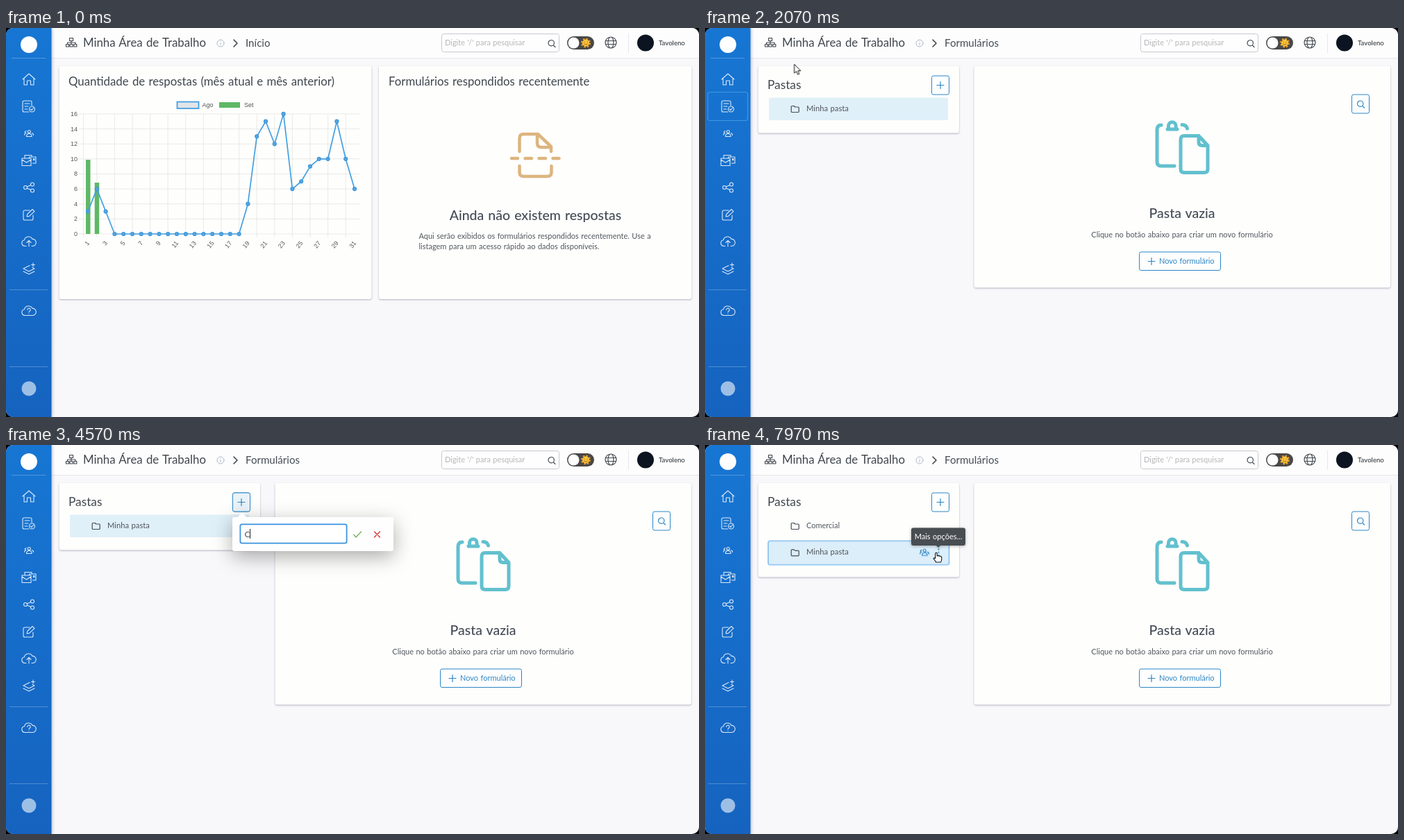
An HTML page for the animation above (8 s loop, 998x561 px).

```html
<!DOCTYPE html>
<html lang="pt-BR">
<head>
<meta charset="utf-8">
<title>Minha Área de Trabalho</title>
<style>
html, body { margin: 0; width: 100%; height: 100%; overflow: hidden; background: #000; }
svg.stage { display: block; width: 100vw; height: 100vh; border-radius: 10px; }
text, .field { font-family: Lato, "Open Sans", sans-serif; font-size: 11px; word-spacing: .06em; fill: #50565c; }
.h1 { font-size: 16.8px; fill: #3f464d; }
.crumb { font-size: 15.1px; fill: #454c53; }
.big { font-size: 19.5px; font-weight: 500; fill: #444b55; text-anchor: middle; }
.mid { text-anchor: middle; }
.axis text { font: 9px "Liberation Sans", Arial, sans-serif; fill: #555; }
.line { fill: none; stroke-linecap: round; stroke-linejoin: round; }
.nav { stroke: #fff; stroke-width: 1.1; opacity: .85; }
.dark { stroke: #454b52; stroke-width: 1.2; }
.blue { stroke: #2b86c5; stroke-width: 1.2; }
.btn { fill: #fefefe; stroke: #2b86c5; }
.card { fill: #fefefd; filter: drop-shadow(0 1px 1.2px rgba(40, 40, 80, .35)); }
.tip text { fill: #fff; }
.tip path { fill: #484d52; filter: drop-shadow(0 1px 2px rgba(0, 0, 0, .3)); }
.field { display: flex; align-items: center; height: 18px; color: #4a4f55; }
.field b { font-weight: 400; font-size: 0; animation: type 8s step-end infinite; }
.field i { width: 1px; height: 14px; background: #222; animation: caret 8s step-end infinite; }

.a { animation: 8s linear infinite; }
.hard { animation-timing-function: step-end; }
.page1 { animation-name: page1; }
.page2 { animation-name: page2; }
.hover { animation-name: hover; }
.focus { animation-name: focus; }
.tipForms { animation-name: tipForms; }
.tipNew { animation-name: tipNew; }
.tipMore { animation-name: tipMore; }
.pop { animation-name: pop; }
.plusOn { animation-name: plusOn; }
.tick { animation-name: tick; }
.grow { animation-name: grow; }
.row { animation-name: row; }
.added { animation-name: added; }
.rowIcons { animation-name: rowIcons; }
.rowFocus { animation-name: rowFocus; }
.cursor { animation-name: cursor; }
.shown { animation-name: shown; }
.arrow { animation-name: arrow; }
.hand { animation-name: hand; }

@keyframes page1 { 0%, 18.5% { opacity: 1 } 19.6%, 100% { opacity: 0 } }
@keyframes page2 { 0%, 19.2% { opacity: 0 } 21%, 100% { opacity: 1 } }
@keyframes hover { 0%, 9.8% { opacity: 0 } 11%, 21.5% { opacity: 1 } 23%, 100% { opacity: 0 } }
@keyframes focus { 0% { opacity: 0 } 17.1% { opacity: 1 } 48.4%, 100% { opacity: 0 } }
@keyframes tipForms { 0%, 10.6% { opacity: 0 } 12.3%, 21.6% { opacity: 1 } 23%, 100% { opacity: 0 } }
@keyframes tipNew { 0%, 37.4% { opacity: 0 } 40%, 48.4% { opacity: 1 } 50%, 100% { opacity: 0 } }
@keyframes tipMore { 0%, 97.6% { opacity: 0 } 99.5%, 100% { opacity: 1 } }
@keyframes pop { 0%, 48.6% { opacity: 0 } 51.4%, 73.4% { opacity: 1 } 75.8%, 100% { opacity: 0 } }
@keyframes plusOn { 0%, 36.4% { opacity: 0 } 38%, 81.3% { opacity: 1 } 83.5%, 100% { opacity: 0 } }
@keyframes tick { 0% { stroke: #c4c8c4 } 57.1%, 100% { stroke: #7cb058 } }
@keyframes grow { 0%, 73.4% { height: 96.5px } 75%, 100% { height: 135.5px } }
@keyframes row { 0%, 73.4% { transform: none } 75%, 91.2% { transform: translateY(39px) } 92%, 100% { transform: translateY(38.3px) } }
@keyframes added { 0%, 74% { opacity: 0 } 75.5%, 100% { opacity: 1 } }
@keyframes rowIcons { 0%, 85% { opacity: 0 } 86.5%, 100% { opacity: 1 } }
@keyframes rowFocus { 0%, 91.2% { opacity: 0 } 93.5%, 100% { opacity: 1 } }
@keyframes type { 0% { font-size: 0 } 63.875% { font-size: 11.8px } 90%, 100% { font-size: 0 } }
@keyframes caret { 0% { opacity: 1 } 55.37% { opacity: 0 } 57.1% { opacity: 1 } 63.37% { opacity: 0 } 63.87%, 100% { opacity: 1 } }
@keyframes cursor {
  0%, .4% { transform: translate(330px, 580px); animation-timing-function: ease-in-out }
  10.4%, 21% { transform: translate(32px, 109px); animation-timing-function: ease-in }
  25.9% { transform: translate(129px, 52px); animation-timing-function: ease-out }
  30%, 33.4% { transform: translate(215px, 66px); animation-timing-function: ease-in-out }
  37.4%, 81.25% { transform: translate(348px, 85px); animation-timing-function: ease-in-out }
  88%, 95.8% { transform: translate(250px, 152px); animation-timing-function: ease-in-out }
  98.2%, 100% { transform: translate(333px, 155px) }
}
@keyframes shown { 0% { opacity: 1 } 57.1% { opacity: 0 } 81.25%, 100% { opacity: 1 } }
@keyframes arrow { 0% { opacity: 1 } 9.5% { opacity: 0 } 22.4% { opacity: 1 } 36.6% { opacity: 0 } 82.5% { opacity: 1 } 86%, 100% { opacity: 0 } }
@keyframes hand { 0% { opacity: 0 } 9.5% { opacity: 1 } 22.4% { opacity: 0 } 36.6% { opacity: 1 } 82.5% { opacity: 0 } 86%, 100% { opacity: 1 } }
</style>
</head>
<body>
<svg class="stage" viewBox="0 0 998 561">
  <defs>
    <linearGradient id="side" x2="0" y2="1">
      <stop stop-color="#1776d3"/><stop offset="1" stop-color="#1563bf"/>
    </linearGradient>
    <path id="cloud" d="M-4 6.500H-6A4.400 4.400 0 0 1-6.600-2.200A6.200 6.200 0 0 1 5-3.600A5 5 0 0 1 5.500 6.500H4"/>
    <path id="folder" d="M-5.500-3.500q0-1 1-1h3l1.500 1.500h4.500q1 0 1 1v5.500q0 1-1 1h-9q-1 0-1-1z"/>
    <path id="people" d="M-1.700-2.500a2 2 0 1 0 4 0a2 2 0 1 0-4 0M-3.500 4.500q0-4 3.800-4t3.800 4zM-3.800-3.200a1.400 1.400 0 1 0-.2 2.700Q-6.300-.3-6.300 2.200M4.300-.3Q6.500 0 6.500 2.500"/>
    <path id="lens" d="M-5-.8a4.200 4.200 0 1 0 8.400 0a4.200 4.200 0 1 0-8.400 0M2.200 2.300L5 5"/>
    <path id="plus" d="M-5 0H5M0-5V5"/>
  </defs>

  <rect width="998" height="561" fill="#f8f8fa"/>

  <!-- header -->
  <rect x="65" width="933" height="43" fill="#fdfdfd"/>
  <path d="M65 43.500H998" stroke="#e6e7ea"/>
  <path class="line dark" d="M91.500 14.500h5v4h-5zM86.500 23.500h4v3.500h-4zM92 23.500h4v3.500h-4zM97.800 23.500h4v3.500h-4zM94 18.500v5M88.500 23.500V21H100v2.500"/>
  <text class="h1" x="111" y="27">Minha Área de Trabalho</text>
  <g class="line" stroke="#b3b8cb"><circle cx="309" cy="22" r="5"/><path d="M309 21.500v3M309 19.300v.1"/></g>
  <path class="line" d="M328 17l5 5-5 5" stroke="#41474d" stroke-width="1.600"/>
  <text class="crumb a page1" x="345" y="27">Início</text>
  <text class="crumb a page2" x="345" y="27">Formulários</text>
  <rect x="627.500" y="8.500" width="169" height="26" rx="3" fill="#fefefe" stroke="#c6c9cf"/>
  <text x="632" y="25" style="fill:#b5b6b9">Digite '/' para pesquisar</text>
  <use href="#lens" class="line dark" x="786" y="22.500"/>
  <rect x="808" y="12" width="39" height="19" rx="9.500" fill="#484848"/>
  <circle cx="817.500" cy="21.500" r="8" fill="#fdfdfd"/>
  <circle cx="835" cy="21.500" r="5.800" fill="none" stroke="#e99b28" stroke-width="2.500" stroke-dasharray="2.500 2"/>
  <circle cx="835" cy="21.500" r="5" fill="#fbc53a"/>
  <path class="line" d="M833 20v.6M837 20v.6M832.500 23q2.500 2.500 5 0" stroke="#a76618"/>
  <path class="line dark" d="M863 21a8 8 0 1 0 16 0a8 8 0 1 0-16 0zM867 21a4 8 0 1 0 8 0a4 8 0 1 0-8 0zM863.500 18.500h15M863.500 23.500h15"/>
  <path d="M896.500 8V36" stroke="#e6e7ec"/>
  <circle cx="921" cy="21.500" r="12" fill="#0b1420"/>
  <text x="940" y="25" style="font-size:9.600px;font-weight:500;fill:#333a40">Tavoleno</text>

  <!-- dashboard -->
  <g class="a page1">
    <rect class="card" x="76.500" y="55" width="450" height="336" rx="3"/>
    <rect class="card" x="537" y="55" width="450.500" height="336" rx="3"/>
    <text class="h1" x="90" y="83">Quantidade de respostas (mês atual e mês anterior)</text>
    <text class="h1" x="551" y="83">Formulários respondidos recentemente</text>
    <g id="chart" class="axis"></g>
    <path class="line" stroke="#dcb57f" stroke-width="4.500" d="M739.500 178v-19q0-6 6-6H766l19 18v7M765 153v13q0 6 6 6h14M739.500 199v9q0 6 6 6h34q6 0 6-6v-9M728 188h9M747.500 188h9.500M767.500 188h9.500M787.500 188h9"/>
    <text class="big" x="762.500" y="276.500">Ainda não existem respostas</text>
    <text x="594.500" y="304">Aqui serão exibidos os formulários respondidos recentemente. Use a</text>
    <text x="594.500" y="319">listagem para um acesso rápido ao dados disponíveis.</text>
  </g>

  <!-- forms -->
  <g class="a page2">
    <rect class="card a grow" x="76.500" y="55" width="289.500" height="96.500" rx="3"/>
    <rect class="card" x="387.500" y="55" width="599.500" height="319.500" rx="3"/>
    <text class="h1" style="font-size:17.300px" x="90" y="87.500">Pastas</text>
    <rect class="btn" x="326.500" y="69" width="25" height="27" rx="2.500"/>
    <rect class="btn a plusOn" x="326.500" y="69" width="25" height="27" rx="2.500" style="fill:#e8f2f9"/>
    <use href="#plus" class="line blue" x="339" y="82.500"/>
    <g class="a added">
      <use href="#folder" class="line dark" x="129.700" y="117"/>
      <text x="146" y="120">Comercial</text>
    </g>
    <g class="a row">
      <rect x="92" y="100.500" width="258" height="32.500" rx="2" fill="#e0f0f9"/>
      <rect class="a rowFocus" x="91" y="100" width="260.500" height="34.500" rx="3" fill="#dceefa" stroke="#84c0f0" stroke-width="1.600"/>
      <use href="#folder" class="line dark" x="129.700" y="117"/>
      <text x="146" y="120" style="font-size:11.200px">Minha pasta</text>
      <g class="a rowIcons">
        <use href="#people" class="line blue" x="316" y="116.500"/>
        <path class="line" d="M336.500 112v.1M336.500 116.500v.1M336.500 121v.1" stroke="#2b86c5" stroke-width="2.200"/>
      </g>
    </g>
    <rect class="btn" x="931.500" y="96" width="25" height="27" rx="2.500"/>
    <use href="#lens" class="line blue" x="944.500" y="110"/>
    <path class="line" stroke="#62c0ce" stroke-width="5" d="M676 199h-19q-6 0-6-6V147q0-7 6-7M666 146h14M667.500 145v-4a5.300 5.300 0 0 1 10.600 0v4M687 139.500q6 0 7.500 5.500M711 155.500h-21q-5 0-5 5v43q0 5 5 5h29q5 0 5-5v-34l-13-14v9q0 5 5 5h8"/>
    <text class="big" x="687" y="273.500">Pasta vazia</text>
    <text class="mid" x="687" y="302">Clique no botão abaixo para criar um novo formulário</text>
    <rect class="btn" x="625.500" y="323" width="117" height="26.500" rx="2.500"/>
    <use href="#plus" class="line blue" x="643" y="336.500"/>
    <text x="654" y="340" style="fill:#2b86c5">Novo formulário</text>
  </g>

  <!-- sidebar -->
  <rect width="65.500" height="561" fill="url(#side)" style="filter:drop-shadow(1px 0 2px rgba(30,60,140,.35))"/>
  <path d="M8 43.500H57M5 377.500H60M5 488.500H60" stroke="#fff" opacity=".25"/>
  <circle cx="33" cy="24" r="12" fill="#fff"/>
  <rect class="a hover" x="5" y="94" width="55.500" height="38.500" rx="3" fill="#fff" fill-opacity=".13"/>
  <rect class="a hard focus" x="4" y="92.500" width="57.500" height="41" rx="3" fill="none" stroke="#3f97e2" stroke-width="1.200"/>
  <g class="line nav">
    <path transform="translate(33 74)" d="M-9 0L0-8 9 0M-7-1.500V8h4.500V2h5V8H7V-1.500"/>
    <path transform="translate(32 113)" d="M1 8H-6a2 2 0 0 1-2-2V-6a2 2 0 0 1 2-2H3a2 2 0 0 1 2 2V-1.500M-5-4H2M-5 0H0M-5 4H-1M1.500 4a4 4 0 1 0 8 0a4 4 0 1 0-8 0M3.500 4l1.500 1.500L7.500 2.500"/>
    <use href="#people" x="33" y="152"/>
    <path transform="translate(33 191)" d="M-6-3V-7.500H4V-5M5.500 4H10V-5H.5V-3M-10-3H3V7.500H-10zM-10-1L-3.500 3 3-1M6.500-2.500h1.500v2H6.500z"/>
    <path transform="translate(33 230)" d="M-7.500 0a2.500 2.500 0 1 0 5 0a2.500 2.500 0 1 0-5 0M2.500-4.500a2.500 2.500 0 1 0 5 0a2.500 2.500 0 1 0-5 0M2.500 4.500a2.500 2.500 0 1 0 5 0a2.500 2.500 0 1 0-5 0M-2.700-1L2.700-3.500M-2.700 1L2.700 3.500"/>
    <path transform="translate(33 269)" d="M1-6H-6a2 2 0 0 0-2 2V6a2 2 0 0 0 2 2H4a2 2 0 0 0 2-2V1M-3 3l.8-3.500L5-7.500 8-4.700.6 2.400z"/>
    <g transform="translate(33 308)"><use href="#cloud"/><path d="M0 7V-1.500M-3 1.500L0-1.500 3 1.500"/></g>
    <path transform="translate(33 347)" d="M1-4.500L-8 0 0 4 8 0 5-1.500M-8 4L0 8 8 4M6-8v5M3.500-5.500h5"/>
    <g transform="translate(33 408)"><use href="#cloud"/><path d="M-4 6.500H4M-2.200-1.500a2.200 2.200 0 1 1 3.300 1.800Q0 1 0 2M0 4v.1"/></g>
  </g>
  <circle cx="33" cy="520" r="10.500" fill="#9dbfe6"/>

  <!-- overlays -->
  <g class="tip a tipForms">
    <path d="M65 100.500h63q3 0 3 3v20q0 3-3 3H65z"/>
    <text x="68" y="117">Formulários</text>
  </g>
  <g class="tip a tipNew">
    <path d="M357 69h60.500q3 0 3 3v20q0 3-3 3H357q-3 0-3-3V85l-3-3 3-3V72q0-3 3-3z"/>
    <text class="mid" x="387.500" y="86">Nova pasta</text>
  </g>
  <g class="a pop">
    <path d="M329 104h4.500l6.500-6.500 6.500 6.500H555q3 0 3 3v43q0 3-3 3H329q-3 0-3-3V107q0-3 3-3z" fill="#fefefe" style="filter:drop-shadow(0 8px 14px rgba(0,0,0,.33))"/>
    <rect x="336" y="113" width="156" height="30" rx="4" fill="#b4dbf8"/>
    <rect x="337.500" y="114.500" width="153" height="27" rx="2.500" fill="#fff" stroke="#3c91dc" stroke-width="1.500"/>
    <foreignObject x="343.500" y="119" width="140" height="18"><div xmlns="http://www.w3.org/1999/xhtml" class="field" id="field"><i></i></div></foreignObject>
    <path class="line a hard tick" d="M501 129.500l3 3.500 7.500-8" stroke-width="1.400"/>
    <path class="line" d="M530.500 125l8 8M538.500 125l-8 8" stroke="#cf3a35" stroke-width="1.400"/>
  </g>
  <g class="tip a tipMore">
    <path d="M300 119.500h72q3 0 3 3v19.500q0 3-3 3H339l-3 3-3-3H300q-3 0-3-3V122.500q0-3 3-3z"/>
    <text class="mid" x="336" y="136">Mais opções...</text>
  </g>

  <g class="a cursor"><g class="a hard shown" stroke-linejoin="round">
    <path class="a hard arrow" d="M0 0V13L3 10.300 5 15 7.200 14 5.200 9.500H9.200z" fill="#fff" stroke="#111"/>
    <path class="a hard hand" d="M-1.300 1.200Q0-.6 1.300 1.200V5Q2.500 4 3.700 5.200 5 4.400 6 5.700 7.600 5.300 7.800 7V10Q7.600 12 6.500 14H-.5Q-1.500 11.500-3.800 9.200-4 7-1.300 8.500z" fill="#fff" stroke="#111" stroke-width="1.100"/>
  </g></g>
</svg>
<script>
const august = [3, 6, 3, ...Array(15).fill(0), 4, 13, 15, 12, 16, 6, 7, 9, 10, 10, 15, 10, 6];
const dayX = day => 118 + (day - 1) * 12.8;
const valueY = value => 297 - value * 10.82;
const points = august.map((value, i) => [dayX(i + 1), valueY(value)]);

let grid = '', labels = '';
for (let v = 0; v <= 16; v += 2) {
  grid += `M105 ${valueY(v)}H509`;
  labels += `<text x="103" y="${valueY(v) + 3}" text-anchor="end">${v}</text>`;
}
for (let day = 0; day <= 30; day += 2) {
  const x = day ? dayX(day) : 111.6;
  grid += `M${x} 124V302`;
  labels += `<text transform="translate(${dayX(day + 1) + 1} 309) rotate(-50)" text-anchor="end" dominant-baseline="middle">${day + 1}</text>`;
}

document.getElementById('chart').innerHTML = `
  <path d="${grid}" stroke="#e7e7e2" stroke-width=".9"/>
  <rect x="246.500" y="106.500" width="31" height="9.500" fill="#e2e5e8" stroke="#459fe0" stroke-width="1.800"/>
  <text x="282.500" y="114">Ago</text>
  <rect x="307" y="107" width="30" height="8" fill="#5fb865"/>
  <text x="343" y="114">Set</text>
  <path d="M115 190h6.500V297H115zM127.700 223h6.500V297h-6.500z" fill="#5fb865"/>
  <polyline class="line" points="${points}" stroke="#459fe0" stroke-width="1.700"/>
  ${points.map(([x, y]) => `<circle cx="${x}" cy="${y}" r="2.500" fill="#5aa5dc" stroke="#3b97dc" stroke-width="1.200"/>`).join('')}
  ${labels}`;

// The first letter comes early, the rest at an even pace.
document.getElementById('field').insertAdjacentHTML('afterbegin', [...'Comercial']
  .map((letter, i) => `<b style="animation-delay:${i ? (i - 1) * 74 : -540}ms">${letter}</b>`).join(''));
</script>
</body>
</html>
```
